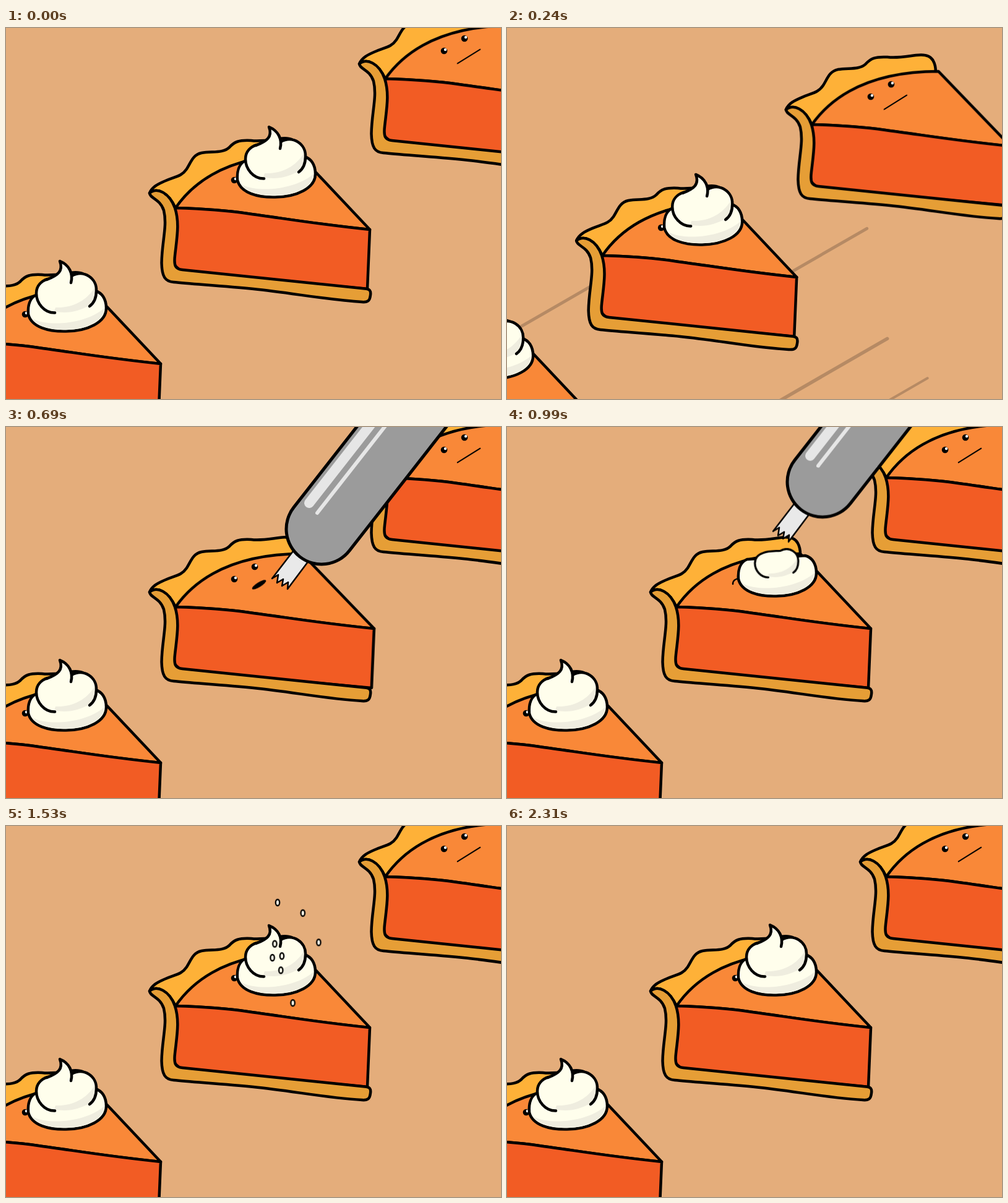
These frames come from a looping animation (800x600 px, 2340 ms). An HTML page:

```html
<!DOCTYPE html>
<html lang="en">
<head>
<meta charset="utf-8">
<title>Pie line</title>
<style>
html, body { margin: 0; width: 100%; height: 100%; overflow: hidden; background: #e4ad7b; }
svg { display: block; width: 100vw; height: 100vh; }
.ink { stroke: #000; stroke-width: 4.5; stroke-linecap: round; stroke-linejoin: round; }
.line { fill: none; }
.speed { stroke: #b68a64; stroke-width: 5; stroke-linecap: round; fill: none; }

.pie, .speed, .filling, .open, .shut, .lips, .mouth, .low, .high, .tip,
.blob, .tool, .gravity, .drop { animation: 2340ms linear infinite both; }
.pie, .low, .high, .tip, .tool { animation-timing-function: cubic-bezier(.333, 0, .667, 1); }

.pie { animation-name: ride; }
.p1 { --a: -338px 217px; --b: -676px 434px; }
.p2 { --a: 0px 0px; --b: -338px 217px; }
.p3 { --a: 339px -209px; --b: 0px 0px; }
.p4 { --a: 678px -418px; --b: 339px -209px; }
@keyframes ride {
  0% { translate: var(--a); }
  25.64%, 100% { translate: var(--b); }
}

.speed { animation-name: whoosh; }
@keyframes whoosh { to { translate: 3744px -2162px; } }

.filling { animation-name: settle; transform-origin: 274px 300px; }
@keyframes settle {
  0%, 29.49% { transform: scaleX(1.022); }
  41%, 100% { transform: none; }
}

.open { animation-name: open; }
.shut { animation-name: shut; }
@keyframes open { 0%, 32.9% { opacity: 1; } 33%, 62% { opacity: 0; } 62.1%, 100% { opacity: 1; } }
@keyframes shut { 0%, 32.9% { opacity: 0; } 33%, 62% { opacity: 1; } 62.1%, 100% { opacity: 0; } }

.lips { animation-name: shrink; }
.mouth { animation-name: gape; }
@keyframes shrink { 0%, 25.64% { transform: none; } 29.3%, 100% { transform: scaleX(.55); } }
@keyframes gape { 0%, 25.64% { transform: scale(1, 0); } 29.3%, 100% { transform: none; } }

.low { animation-name: low; transform-origin: 440px 256px; }
.high { animation-name: high; transform-origin: 436px 242px; }
.tip { animation-name: tip; transform-origin: 432px 190px; }
@keyframes low {
  0%, 29.6% { transform: scale(0); }
  39%, 100% { transform: none; }
}
@keyframes high {
  0%, 36.8% { transform: scale(0); }
  45.3%, 100% { transform: none; }
}
@keyframes tip {
  0%, 43.6% { transform: scale(0); }
  50%, 52.6% { transform: scale(1, 1.15); }
  62% { transform: scale(1, .95); }
  78.2% { transform: scale(1, 1.13); }
  98.7%, 100% { transform: none; }
}

.blob { animation-name: blob; transform-origin: 431px 156px; }
@keyframes blob {
  0%, 47.4% { transform: scale(0); }
  50%, 53% { transform: none; }
  57.3%, 100% { transform: scale(0); }
}

.tool { animation-name: pipe; transform-origin: 442px 253px; }
@keyframes pipe {
  0%, 14.1% { transform: translateY(-356px) rotate(17.5deg); }
  26.92%, 29.49% { transform: translateY(0) rotate(0deg); }
  47.44% { transform: translateY(-95px) rotate(0deg); }
  57.69%, 100% { transform: translateY(-301px) rotate(-5deg); }
}

.gravity { animation-name: gravity; }
.drop { animation-name: toss, fade; }
@keyframes gravity {
  0%, 50% { translate: 0 0; animation-timing-function: cubic-bezier(.333, 0, .667, .333); }
  87.2%, 100% { translate: 0 568px; }
}
@keyframes toss {
  0%, 50% { translate: 0 0; }
  87.2%, 100% { translate: var(--dx) var(--dy); }
}
@keyframes fade {
  0%, 50% { opacity: 0; }
  50.01%, 69.2% { opacity: 1; }
  87.2%, 100% { opacity: 0; }
}
</style>
</head>
<body>
<svg viewBox="0 0 800 600" preserveAspectRatio="none">
  <defs>
    <path id="rim" class="ink" fill="#feb138" d="M232 267C236 257 246 252 258 247C274 240 284 240 292 228C299 217 302 205 316 202C334 199 350 203 361 193C369 184 376 181 396 182C412 184 426 181 442 179C456 177 466 180 470 188C474 195 474 201 474 206L274 291C262 265 244 258 232 267Z"/>
    <g id="filling" class="ink">
      <path fill="#f98838" d="M274 291C294 262 345 205 474 205L588 326C500 317 450 308 390 300C350 294 310 292 274 291Z"/>
      <path fill="#f25c24" d="M274 291C310 292 350 294 390 300C450 308 500 317 588 326L584 422L284 394L268 380Z"/>
    </g>
    <path id="wall" class="ink" fill="#e69e36" d="M232 267C233 276 249 276 255 295C261 320 252 345 251.500 380C252 402 257 410 271 411C300 414 350 417 400 422C460 428 520 440 575 443C586 444 588 440 589 432C590 425 588 422 580 421.500L285 391C274 390 271 385 273 368C276 340 281 315 273 291C264 266 244 257 232 267Z"/>
    <g id="eye"><circle r="5.300"/><circle cx="2" cy="-2" r="2.200" fill="#fff"/></g>
    <path id="lips" class="line" stroke="#000" stroke-width="2" stroke-linecap="round" d="M-21.500 0H21.500"/>
    <g id="face">
      <use href="#eye" x="369" y="246"/>
      <use href="#eye" x="402" y="226"/>
      <use href="#lips" transform="translate(409 255) rotate(-32)"/>
    </g>
    <g id="low">
      <path class="ink" fill="#fffeec" d="M388 214C376 219 373 233 374 246C379 267 407 274 435 273.500C470 273 500 259 500 236C500 221 493 211 482 208Z"/>
      <path fill="#efeddf" d="M380 253C410 268 470 260 497 236C496 258 467 271 435 271.300C410 271 388 266 380 253Z"/>
    </g>
    <g id="high">
      <path fill="#fffeec" d="M417 243C400 243 387 228 387 212C387 199 396 192 405 189C418 184 432 185 444 184C464 173 485 188 484 208C484 219 480 228 473 233L450 246Z"/>
      <path fill="#efeddf" d="M418 235C446 236 468 224 481 203C483 217 479 227 472 232C456 241 436 246 416 241Z"/>
      <path class="ink line" d="M417 243.500C400 244 387 228 387 212C387 199 396 192 405 189C418 184 432 185 444 184C464 173 485 188 484 208C484 219 480 228 473 233"/>
    </g>
    <g id="tip">
      <path fill="#fffeec" d="M402 191C422 183 431 176 425 160C440 166 447 180 443 195Q424 204 402 191Z"/>
      <path class="ink line" d="M404 190C422 183 431 176 425 160C440 166 447 180 443 195"/>
    </g>
    <g id="plain">
      <use href="#rim"/><use href="#filling"/><use href="#wall"/><use href="#face"/>
    </g>
    <g id="creamed">
      <use href="#plain"/><use href="#low"/><use href="#high"/><use href="#tip"/>
    </g>
  </defs>

  <rect width="800" height="600" fill="#e4ad7b"/>
  <g class="speed">
    <path d="M-506 788l338 -195M-9 665l205 -118"/>
    <path style="stroke-width:5.500" d="M-41 881l270 -156"/>
    <path style="stroke-width:4" d="M-15 967l309 -178"/>
  </g>

  <use class="pie p4" href="#plain"/>
  <use class="pie p1" href="#creamed"/>
  <use class="pie p2" href="#creamed"/>
  <g class="pie p3">
    <use href="#rim"/>
    <g class="filling"><use href="#filling"/></g>
    <use href="#wall"/>
    <g class="open">
      <use href="#eye" x="369" y="246"/>
      <use href="#eye" x="402" y="226"/>
    </g>
    <g class="shut line" stroke="#000" stroke-width="2.500" stroke-linecap="round">
      <path d="M365 254C365 248 370 245 376 245M398 234C398 228 403 225 409 225"/>
    </g>
    <g transform="translate(409 255) rotate(-32)">
      <g class="lips"><use href="#lips"/></g>
      <ellipse class="mouth" rx="13" ry="3.800"/>
    </g>
    <g class="low"><use href="#low"/></g>
    <g class="high"><use href="#high"/></g>
    <g class="tip"><use href="#tip"/></g>
  </g>

  <g class="gravity" id="drops"></g>
  <g class="blob" fill="#fffeec">
    <g stroke="#000" stroke-width="5">
      <ellipse cx="430" cy="144" rx="6.500" ry="9"/>
      <circle cx="435" cy="149" r="4.500"/>
    </g>
    <ellipse cx="430" cy="144" rx="6.500" ry="9"/>
    <circle cx="435" cy="149" r="4.500"/>
  </g>

  <g class="tool">
    <path fill="#e9e9e9" stroke="#000" stroke-width="2.500" stroke-linejoin="round" d="M470 193L430 245L440 239L438 252L448 246L446 257L456 251L455 262L494 210Z"/>
    <g class="line" stroke-linecap="round">
      <path stroke="#000" stroke-width="119" d="M510 165L880 -308"/>
      <path stroke="#9b9b9b" stroke-width="109" d="M510 165L880 -308"/>
      <path stroke="#e6e6e6" stroke-width="16" d="M490 123L860 -350"/>
      <path stroke="#e6e6e6" stroke-width="6" d="M503 139L873 -334"/>
    </g>
  </g>
</svg>
<script>
// Each drop: start x, y and the place it passes 660 ms later.
const drops = [
  [434, 142, 443, 257], [436, 141, 516, 289], [443, 142, 557, 375], [430, 146, 438, 376],
  [430, 146, 431, 417], [430, 146, 459, 412], [430, 146, 456, 454], [434, 165, 488, 535]
];
const share = 660 / 870, fall = 327;
const layer = document.getElementById('drops');
for (const [x, y, tx, ty] of drops) {
  const drop = document.createElementNS('http://www.w3.org/2000/svg', 'ellipse');
  const attrs = { class: 'drop', cx: x, cy: y, rx: 3.2, ry: 5, fill: '#fffeec', stroke: '#000', 'stroke-width': 2.3 };
  for (const key in attrs) drop.setAttribute(key, attrs[key]);
  drop.style.setProperty('--dx', (tx - x) / share + 'px');
  drop.style.setProperty('--dy', (ty - fall - y) / share + 'px');
  layer.append(drop);
}
</script>
</body>
</html>
```
